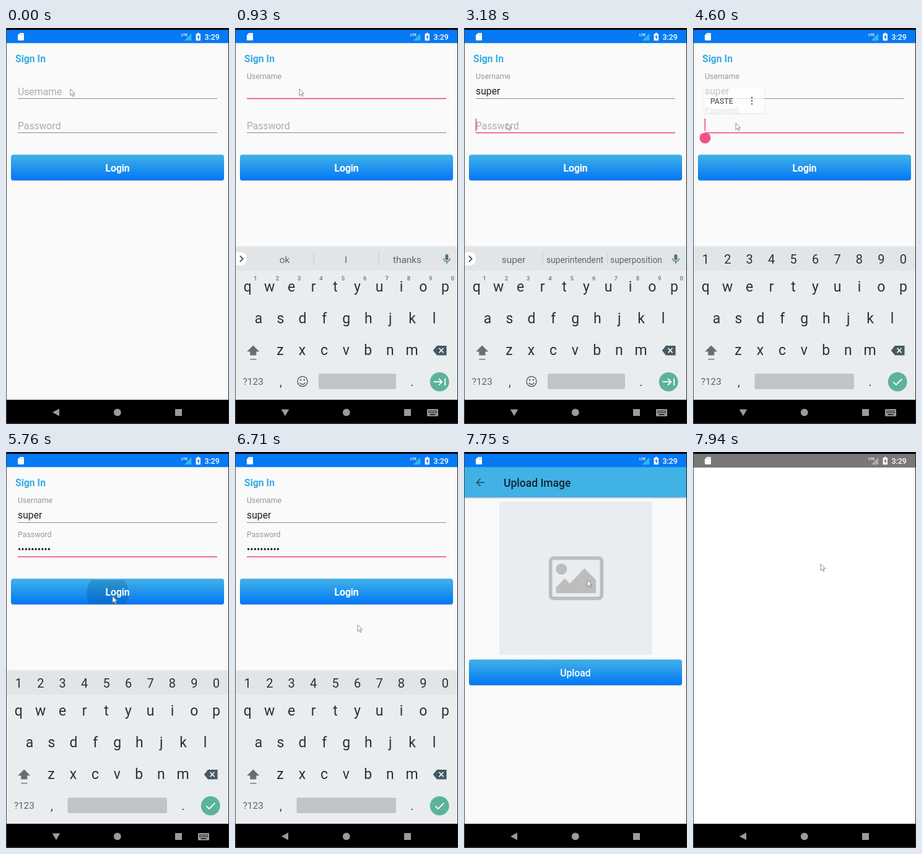
These frames come from a looping animation (360 px wide and 637 px high, 7.99 s). An HTML page:

```html
<!DOCTYPE html>
<html lang="en">
<head>
<meta charset="utf-8">
<title>Sign in and upload</title>
<style>
  html, body { margin: 0; width: 100%; height: 100%; overflow: hidden; background: #000; }
  svg { display: block; width: 100%; height: 100%; font-family: Roboto, "Noto Sans", sans-serif; }
  .mid { text-anchor: middle; }
  .med { font-weight: 500; }
  .bold { font-weight: 700; }
  .body { font-size: 15.75px; }
</style>
</head>
<body>
<svg id="stage" viewBox="0 0 360 637" preserveAspectRatio="none"></svg>
<script>
const LOOP = 7990;
const PINK = '#f0508c';
const USER = 'super';

const text = (x, y, size, fill, str, cls = '', id = '') =>
  `<text id="${id}" x="${x}" y="${y}" font-size="${size}" fill="${fill}" class="${cls}">${str}</text>`;
const rect = (x, y, w, h, fill, extra = '') =>
  `<rect x="${x}" y="${y}" width="${w}" height="${h}" fill="${fill}" ${extra}/>`;
const path = (d, fill, extra = '') => `<path d="${d}" fill="${fill}" ${extra}/>`;
const group = (id, inner, extra = '') => `<g id="${id}" ${extra}>${inner}</g>`;

const button = (y, label) =>
  rect(8, y + 1.5, 344, 41, '#000', 'rx="4" opacity=".2"') +
  rect(8, y, 344, 41.3, 'url(#blue)', 'rx="4"') +
  text(180, y + 27.2, 15.75, '#fff', label, 'mid med');

const keyRow = (letters, x, y, size = 23) => [...letters]
  .map((c, i) => text(x + i * 35.45, y, size, '#263238', c, 'mid')).join('');

const field = (name, y) =>
  group(name + 'Label', text(0, 0, 15.75, '#aaa', name, '', name + 'Text')) +
  group(name + 'Line', rect(19, y, 322, 1, '#8a8a8a')) +
  group(name + 'Focus', rect(19, y - .3, 322, 1.7, PINK));

const login =
  rect(1, 24, 358, 574, '#fafafa') +
  text(15, 55, 15.75, '#35ade2', 'Sign In', 'bold') +
  field('Username', 113) + field('Password', 168) +
  text(19, 107, 15.75, '#212121', '', '', 'user') +
  text(19, 161.5, 15.75, '#212121', '•'.repeat(10), '', 'secret') +
  rect(18.5, 0, 1.7, 20, PINK, 'id="caret"') +
  button(203.7, 'Login') +
  `<g clip-path="url(#buttonClip)"><circle id="ripple" cy="227" fill="#00466e"/></g>` +
  text(180, 230.9, 15.75, '#fff', 'Login', 'mid med') +
  path('M19.5 168l6.6 2.6a9 9 0 1 1-13.2 0z', PINK, 'id="handle"') +
  group('popup',
    rect(17, 97.5, 99, 41, '#000', 'rx="2" opacity=".16"') +
    rect(17.5, 96.5, 98, 41, '#fff', 'rx="2"') +
    text(28, 121.5, 12.25, '#303030', 'PASTE', 'med') +
    [112, 117, 122].map(y => `<circle cx="95" cy="${y}" r="1.6" fill="#555"/>`).join(''));

const wordsBar =
  rect(1, 360.5, 18, 21.5, '#fff', 'rx="9"') + rect(1, 360.5, 9, 21.5, '#fff') +
  path('M8 366.5l4.7 4.8-4.7 4.8', 'none', 'stroke="#37474f" stroke-width="1.7"') +
  rect(126.5, 361, 1, 21, '#c3c9cc') + rect(231.5, 361, 1, 21, '#c3c9cc') +
  [80, 179, 278].map((x, i) => text(x, 377.5, 15.4, '#5a676d', '', 'mid', 'word' + i)).join('') +
  rect(339.4, 364, 5, 9.5, '#546e7a', 'rx="2.5"') +
  path('M336.7 370.5a5.2 5.2 0 0 0 10.4 0M341.9 376v3.5', 'none', 'stroke="#546e7a" stroke-width="1.4"');

const keyboard =
  rect(1, 350.5, 358, 2, '#000', 'opacity=".05"') +
  rect(1, 352, 358, 246, '#e9edf0') + rect(1, 352, 358, 38, '#e1e5e8') +
  group('wordMode', wordsBar +
    [...'1234567890'].map((c, i) => text(33 + i * 35.35, 406, 9.5, '#66747b', c, 'mid med')).join('') +
    `<g fill="none" stroke="#546066" stroke-width="1.4"><circle cx="109" cy="568.5" r="8"/><path d="M104.8 570.5a4.6 4.6 0 0 0 8.4 0"/></g>` +
    `<circle cx="106.2" cy="566" r="1.3" fill="#546066"/><circle cx="111.8" cy="566" r="1.3" fill="#546066"/>` +
    rect(135, 556, 125, 25, '#c2c3c4', 'rx="3"')) +
  group('secretMode', keyRow('1234567890', 20.3, 379, 20) +
    rect(99.5, 556, 160.5, 25, '#c2c3c4', 'rx="3"')) +
  keyRow('qwertyuiop', 20.3, 423.5) + keyRow('asdfghjkl', 38, 474.5) + keyRow('zxcvbnm', 73, 526) +
  path('M29.3 510.5l10 10h-5v6h-10v-6h-5z', '#6b6d6e') + rect(24.5, 532.3, 10, 1.3, '#6b6d6e') +
  path('M326 511h15.5v15.5h-15.5l-6.3-7.7z', '#455a64') +
  path('M329.5 515l7 7.4m0-7.4l-7 7.4', 'none', 'stroke="#fff" stroke-width="1.6"') +
  text(29.3, 574, 15.3, '#58656b', '?123', 'mid') +
  text(74, 576, 20, '#37474f', ',', 'mid') + text(286, 576, 20, '#37474f', '.', 'mid') +
  `<circle cx="330.2" cy="569.2" r="15.4" fill="#5cb39a"/>` +
  group('next', path('M320.5 569.2h14m-5.5-5.2l5.3 5.2-5.3 5.2M339 563.5v11.4', 'none', 'stroke="#fff" stroke-width="1.8"')) +
  group('done', path('M323.3 569.3l4.7 4.7 9.3-9.4', 'none', 'stroke="#fff" stroke-width="1.8"'));

const upload =
  rect(1, 24, 358, 574, '#fafafa') +
  rect(1, 72, 358, 3.5, 'url(#shade)') + rect(1, 24, 358, 49, '#41b2e6') +
  path('M33 49H20.5m6-6l-6 6 6 6', 'none', 'stroke="#234a5c" stroke-width="1.6"') +
  text(64, 55.5, 17.5, '#10252f', 'Upload Image', 'med') +
  rect(57, 80, 246.5, 246.5, '#e7edf0') +
  rect(139.7, 170.7, 82.6, 64.8, 'none', 'rx="5" stroke="#bdbdbd" stroke-width="5.6"') +
  `<circle cx="157.3" cy="188.4" r="8.9" fill="#bdbdbd"/>` +
  path('M148.5 227v-9l14-14.5 8.5 8.2 23.5-24.7 18.5 19v21z', '#bdbdbd') +
  button(333.7, 'Upload');

const statusIcons =
  path('M22.5 8h5.2q1.3 0 1.3 1.3v9.5q0 1.3-1.3 1.3h-7.4q-1.3 0-1.3-1.3v-7.3z', '#fff') +
  path('M23 9.5v2m2-2v2m2-2v2', 'none', 'stroke="#8ab" stroke-width=".8"') +
  path('M299.3 8.5v11.7h-11.7z', '#35b6e8', 'id="signal"') +
  text(283, 13.4, 6.2, '#fff', 'LTE', 'bold') +
  path('M309 7.8h2.6v1.4h2.4v11h-7.4v-11h2.4z', '#fff') +
  path('M311 10.5l-2.6 4.6h1.7v3.6l2.6-4.7h-1.7z', '#1b6fc4', 'id="bolt"') +
  text(320.5, 19.2, 12.4, '#fff', '3:29', 'med');

const nav =
  rect(0, 598, 360, 39, '#000') +
  group('back', path('M86 612.3v12l-11-6z', '#9b9b9b')) +
  group('hide', path('M74.7 613.5h12.6l-6.3 10.7z', '#9b9b9b')) +
  `<circle cx="179.8" cy="618.3" r="5.9" fill="#9b9b9b"/>` +
  rect(273, 613, 11, 11, '#9b9b9b') +
  group('ime', rect(310, 613, 18, 11.5, '#9b9b9b', 'rx="1"') +
    path('M312 615.8h14M312 618.5h14', 'none', 'stroke="#000" stroke-width="1.3" stroke-dasharray="1.5 1"') +
    rect(314.5, 621, 9, 1.4, '#000'));

document.getElementById('stage').innerHTML = `
  <defs>
    <linearGradient id="blue" x2="0" y2="1"><stop stop-color="#42b2e6"/><stop offset="1" stop-color="#0277f6"/></linearGradient>
    <linearGradient id="shade" x2="0" y2="1"><stop stop-color="#000" stop-opacity=".35"/><stop offset="1" stop-opacity="0"/></linearGradient>
    <clipPath id="buttonClip"><rect x="8" y="206" width="344" height="38.5" rx="3"/></clipPath>
  </defs>` +
  rect(0, 0, 360, 637, '#000') + login + group('upload', upload) + group('keyboard', keyboard) +
  rect(1, 25, 358, 573, '#fff', 'id="blank"') +
  rect(1, 3, 358, 21.3, '#0679f5') + rect(1, 3, 358, 22, '#787878', 'id="greyBar"') +
  statusIcons + nav +
  rect(0, 0, 1, 637, '#4a4a4a') + rect(359, 0, 1, 637, '#222') + rect(0, 636, 360, 1, '#444') +
  path('M0 0v10.6l2.5-2.3 1.8 3.9 1.7-.8-1.8-3.7h3.4z', '#fff', 'id="mouse" stroke="#666" stroke-width=".75"');

const el = {};
document.querySelectorAll('[id]').forEach(e => { el[e.id] = e; });

const ramp = (t, a, b) => Math.min(1, Math.max(0, (t - a) / (b - a)));
const ease = p => p * p * (3 - 2 * p);
const out = p => 1 - (1 - p) ** 3;
const set = (id, name, value) => el[id].setAttribute(name, value);
const show = (id, on) => set(id, 'opacity', Number(on));
const write = (id, str) => { if (el[id].textContent !== str) el[id].textContent = str; };
const within = (t, spans) => spans.some(([a, b]) => t >= a && t < b);

// time, x, y
const mousePath = [
  [0, 104, 98], [2720, 104, 98], [2900, 69, 153], [4700, 69, 153], [4920, 46, 119],
  [5110, 46, 119], [5600, 172, 232], [5910, 172, 232], [6320, 198, 278], [7230, 198, 278],
  [7360, 180, 300], [7520, 197, 229], [7670, 197, 229], [7750, 199, 206], [7940, 206, 180]
];
// time, letters typed, suggestions
const typing = [
  [0, 0, 'ok', 'I', 'thanks'],
  [1190, 1, 's', 'so', 'see'],
  [1400, 2, 'su', 'sure', 'sun'],
  [1490, 3, 'sup', 'support', 'supper'],
  [1730, 4, 'supe', 'super', 'superb'],
  [1820, 5, USER, 'superintendent', 'superposition']
];
const userCaret = [[500, 930], [1190, 2320], [2800, 3180]];
const secretCaret = [[3180, 3590], [4150, 4650], [5070, 5570], [6070, 6590]];

function moveMouse(t) {
  let i = mousePath.findIndex(k => k[0] > t);
  if (i < 0) i = mousePath.length;
  const a = mousePath[i - 1], b = mousePath[i] || a;
  const p = a === b ? 0 : ease(ramp(t, a[0], b[0]));
  set('mouse', 'transform', `translate(${a[1] + (b[1] - a[1]) * p} ${a[2] + (b[2] - a[2]) * p})`);
}

function floatLabel(name, y, p) {
  const grey = Math.round(172 - 20 * p);
  set(name + 'Label', 'transform', `translate(19 ${y - 26 * p}) scale(${1 - .215 * p})`);
  set(name + 'Text', 'fill', `rgb(${grey},${grey},${grey})`);
}

function draw(t) {
  const inUser = t >= 500 && t < 3180, inSecret = t >= 3180;
  floatLabel('Username', 108.3, ease(ramp(t, 500, 700)));
  floatLabel('Password', 163, ease(ramp(t, 3190, 3400)));
  show('UsernameFocus', inUser);
  show('UsernameLine', !inUser);
  show('PasswordFocus', inSecret);
  show('PasswordLine', !inSecret);

  const step = typing.filter(k => k[0] <= t).pop();
  write('user', USER.slice(0, step[1]));
  step.slice(2).forEach((w, i) => {
    write('word' + i, w);
    set('word' + i, 'font-size', w.length > 11 ? 13.8 : 15.4);
  });
  const pasted = t >= 5070;
  show('secret', pasted);

  const entry = inSecret ? (pasted ? el.secret : null) : el.user;
  const width = entry && entry.textContent ? entry.getComputedTextLength() + .3 : 0;
  set('caret', 'x', 18.5 + width);
  set('caret', 'y', inSecret ? 145.7 : 91);
  show('caret', within(t, inSecret ? secretCaret : userCaret));
  show('handle', pasted ? 0 : ramp(t, 4130, 4260));
  show('popup', ease(ramp(t, 4490, 4660)) * (1 - ramp(t, 5070, 5200)));

  const spread = ramp(t, 5690, 6050);
  set('ripple', 'cx', 160 + 20 * spread);
  set('ripple', 'r', t < 5690 ? 0 : 15 + 70 * spread + 125 * spread * spread);
  show('ripple', .24 * (1 - ramp(t, 5950, 6320)));

  const rise = out(ramp(t, 620, 920)), fall = ease(ramp(t, 6740, 6890));
  set('keyboard', 'transform', `translate(0 ${248 * (1 - rise + fall)})`);
  const numbers = t >= 3320;
  show('wordMode', !numbers);
  show('next', !numbers);
  show('secretMode', numbers);
  show('done', numbers);

  const imeUp = t >= 620 && t < 6680;
  show('back', !imeUp);
  show('hide', imeUp);
  show('ime', imeUp);

  const open = ramp(t, 6730, 6890);
  show('upload', open);
  set('upload', 'transform', `translate(0 ${46 * (1 - out(open))})`);

  const leave = ramp(t, 7780, 7930);
  show('blank', leave);
  show('greyBar', leave);
  set('signal', 'fill', leave > .5 ? '#aaa' : '#35b6e8');
  set('bolt', 'fill', leave > .5 ? '#666' : '#1b6fc4');
  moveMouse(t);
}

function tick() {
  draw(performance.now() % LOOP);
  requestAnimationFrame(tick);
}
tick();
</script>
</body>
</html>
```
